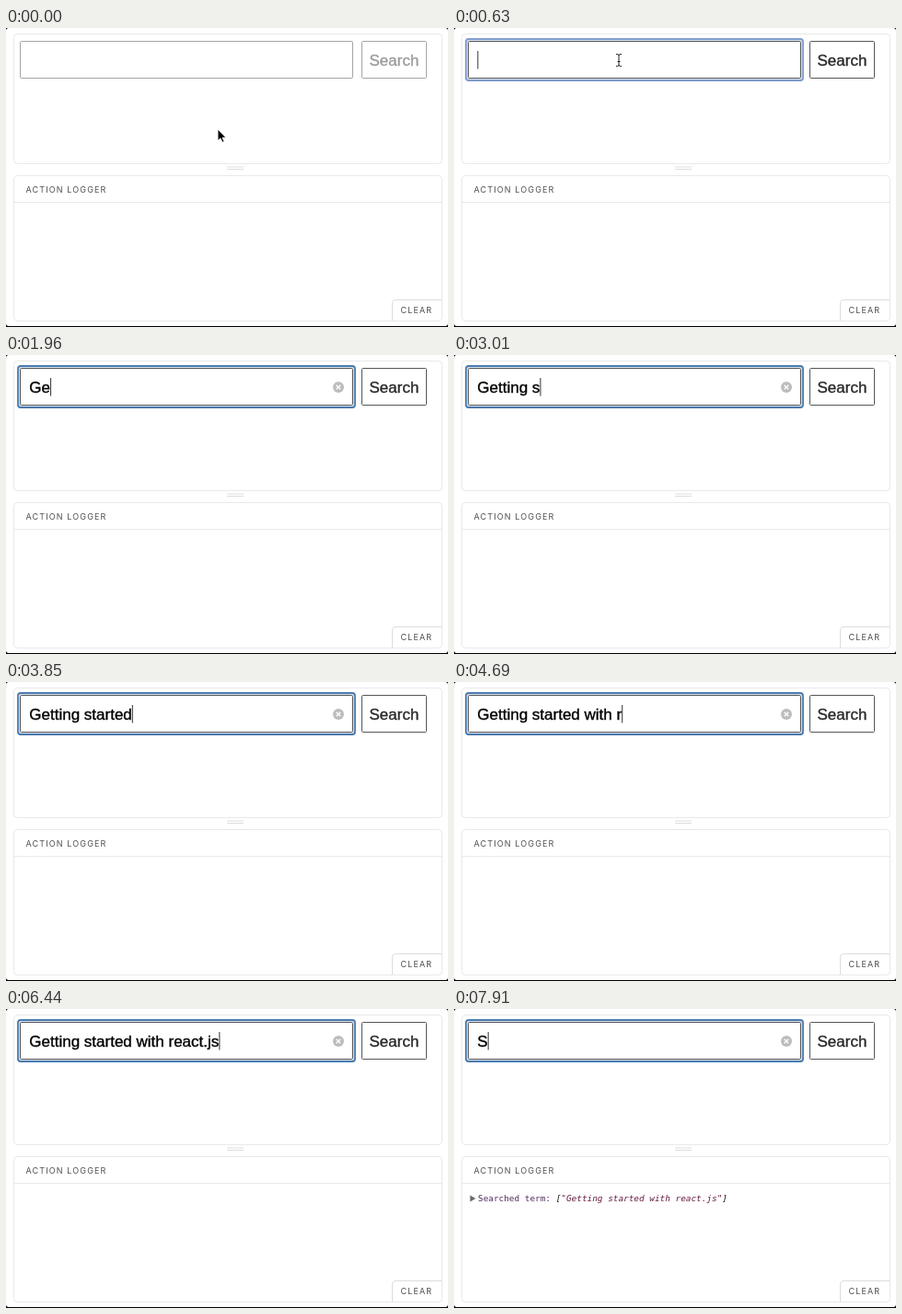
Write an HTML page that moves like this. It is 480 by 325 pixels and loops after 8000 ms.

```html
<!DOCTYPE html>
<html lang="en">
<head>
<meta charset="utf-8">
<title>Search field with action logger</title>
<style>
  html, body { margin: 0; width: 100%; height: 100%; overflow: hidden; background: #000; }
  svg { display: block; width: 480px; height: 325px; }
  text { white-space: pre; }
  .field { font: 17px "Liberation Sans", Arial, sans-serif; stroke-width: .35px; }
  .label { font: 9px Inter, sans-serif; letter-spacing: 1.13px; fill: #505050; }
  .log { font: 9.4px "DejaVu Sans Mono", monospace; }
  .panel { fill: #fff; stroke: #e9e9e9; }
</style>
</head>
<body>
<svg viewBox="0 0 480 325">
  <rect width="480" height="324" rx="3" fill="#fff"/>

  <rect class="panel" x="8.5" y="6.5" width="465" height="141" rx="4"/>
  <path d="M240 151H258M240 153.500H258" stroke="#dedede"/>
  <rect class="panel" x="8.5" y="160.5" width="465" height="158" rx="4"/>
  <path d="M9 189.5H473" stroke="#e9e9e9"/>
  <path d="M419.5 318V299q0-3.500 3.500-3.500H473" fill="none" stroke="#dcdcdc"/>
  <text class="label" x="21.500" y="179">ACTION LOGGER</text>
  <text class="label" x="428.500" y="310">CLEAR</text>

  <g id="ring" fill="none">
    <rect x="13.5" y="12.5" width="365" height="44" rx="2.500" stroke="#dce6f2" stroke-width="3"/>
    <rect id="edge" x="13" y="12" width="366" height="45" rx="3" stroke-width="1.800"/>
  </g>
  <g id="controls" fill="none">
    <rect x="15.5" y="14.5" width="361" height="40" rx="1"/>
    <rect x="386.5" y="14.5" width="70" height="40" rx="1"/>
  </g>
  <text id="button" class="field" x="394.5" y="41">Search</text>
  <text id="query" class="field" x="25.3" y="41" stroke="#000"></text>
  <rect id="caret" y="25" width="1.100" height="19.500" fill="#444"/>
  <g id="clear">
    <circle cx="361" cy="35" r="6" fill="#bdbdbd"/>
    <path d="M358.700 32.700l4.600 4.600m0-4.600l-4.600 4.600" stroke="#fff" stroke-width="1.400"/>
  </g>

  <g id="log" class="log">
    <path d="M17.500 202.500v7l6-3.500z" fill="#6a6a6a"/>
    <text x="26" y="209" fill="#552a60">Searched term: <tspan font-style="italic" fill="#111">[</tspan><tspan font-style="italic" fill="#651a40">"Getting started with react.js"</tspan><tspan font-style="italic" fill="#111">]</tspan></text>
  </g>

  <path id="arrow" d="M0 0V12.500L2.900 9.900L5 14.300L7 13.400L5 9.200H8.900Z" fill="#000" stroke="#fff" stroke-width=".9"/>
  <path id="beam" d="M-3-6.500H-1.500Q0-6.500 0-5Q0-6.500 1.500-6.500H3M0-5V5M-3 6.500H-1.500Q0 6.500 0 5Q0 6.500 1.500 6.500H3M-1.500 1.500H1.500" fill="none" stroke="#222"/>
</svg>
<script>
  const LOOP = 8000, FOCUS = 630, SUBMIT = 6650;

  // Runs of typing: text, time of first key, time of last key
  const runs = [
    ['Ge', 1890, 1960],
    ['tting s', 2240, 3010],
    ['t', 3220, 3220],
    ['arted wi', 3290, 4270],
    ['th ', 4340, 4550],
    ['reac', 4690, 5040],
    ['t', 5320, 5320],
    ['.js', 6160, 6440],
    ['S', 7910, 7910]
  ];
  const keys = runs.flatMap(([text, first, last]) =>
    [...text].map((char, i) => ({
      char,
      time: first + (last - first) * i / Math.max(1, text.length - 1)
    })));
  const caretOff = [[1190, 1750], [5810, 6160], [7140, 7700]];

  const el = Object.fromEntries(
    [...document.querySelectorAll('[id]')].map(node => [node.id, node]));
  const show = (node, on) => node.setAttribute('visibility', on ? 'visible' : 'hidden');
  const progress = (t, from, to) => Math.min(1, Math.max(0, (t - from) / (to - from)));
  const ease = p => p * p * (3 - 2 * p);
  const mix = (a, b, p) => a + (b - a) * p;
  const grey = v => `rgb(${v},${v},${v})`;

  function typed(t) {
    const since = t >= SUBMIT ? SUBMIT : 0;
    return keys.filter(k => k.time >= since && k.time <= t).map(k => k.char).join('');
  }

  function drawPointer(t) {
    const p = ease(progress(t, 70, 560));
    const x = mix(230, 179, p), y = mix(110, 35, p);
    const overField = y < 55;
    const place = `translate(${x.toFixed(1)} ${y.toFixed(1)})`;
    el.arrow.setAttribute('transform', place);
    el.beam.setAttribute('transform', place);
    show(el.arrow, !overField);
    show(el.beam, overField && t < keys[0].time);
  }

  function draw(t) {
    const wake = progress(t, 140, 420);
    const ink = grey(Math.round(mix(155, 40, wake)));
    el.controls.setAttribute('stroke', grey(Math.round(mix(165, 85, wake))));
    el.button.setAttribute('fill', ink);
    el.button.setAttribute('stroke', ink);

    show(el.ring, t >= FOCUS);
    el.edge.setAttribute('stroke', t < 840 ? '#7f9ccb' : '#4a7aae');

    const text = typed(t);
    el.query.textContent = text;
    show(el.clear, text !== '');
    const width = text ? el.query.getComputedTextLength() : 0;
    el.caret.setAttribute('x', 25.3 + width);
    show(el.caret, t >= FOCUS && !caretOff.some(([a, b]) => t >= a && t < b));

    show(el.log, t >= SUBMIT);
    drawPointer(t);
  }

  const start = performance.now();
  function tick() {
    const t = (performance.now() - start) % LOOP;
    draw(Math.floor(t / 70 + 1e-6) * 70);
    requestAnimationFrame(tick);
  }
  draw(0);
  requestAnimationFrame(tick);
</script>
</body>
</html>
```
